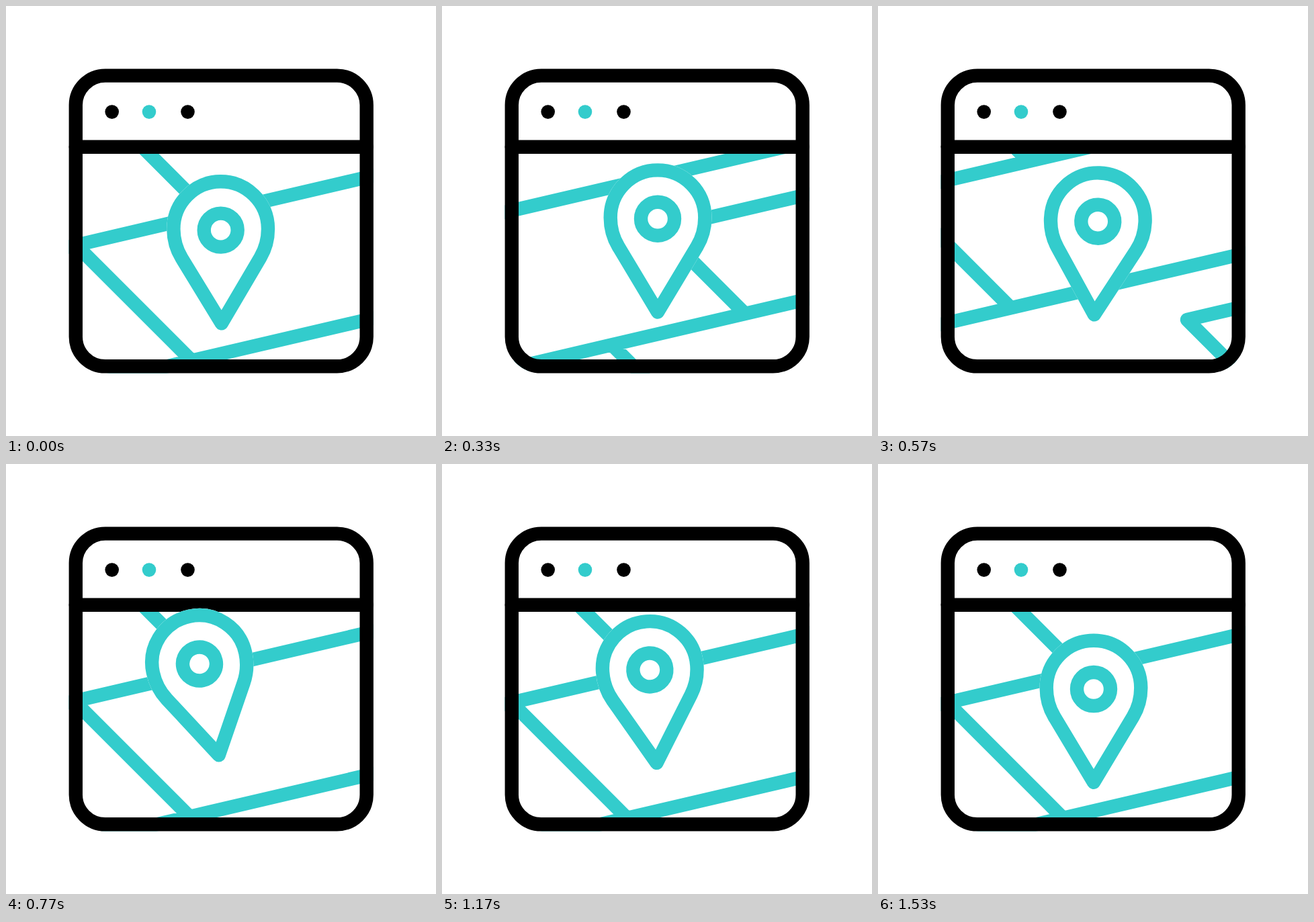
Write an HTML page that moves like this. It is 640 px wide and 640 px high and loops after 1.67 s.

```html
<!DOCTYPE html>
<html lang="en">
<head>
<meta charset="utf-8">
<title>Map window</title>
<style>
  html, body { margin: 0; width: 100%; height: 100%; overflow: hidden; background: #fff; }
  svg { display: block; width: 100vw; height: 100vh; }
  .line { fill: none; stroke-width: 20.4; stroke-linecap: round; stroke-linejoin: round; }
  .teal { stroke: #33cccc; }
  .black { stroke: #000; }
  .white { stroke: #fff; }
</style>
</head>
<body>
<svg viewBox="0 0 640 640">
  <defs>
    <clipPath id="view">
      <path d="M93.6 209.7H546.9V492.5A54 54 0 0 1 492.9 546.5H147.6A54 54 0 0 1 93.6 492.5Z"/>
    </clipPath>
    <path id="drop" d="M321 262.7C282.1 262.7 250.7 294.3 250.7 333.2C250.7 349.3 255 363.7 262.5 376.2L321 473.8L379.5 376.2C387 363.7 391.3 349.3 391.3 333.2C391.3 294.3 359.9 262.7 321 262.7Z"/>
  </defs>
  <g clip-path="url(#view)"><path id="roads" class="line teal"/></g>
  <rect class="line black" x="103.8" y="103.6" width="432.9" height="432.7" rx="44"/>
  <path class="line black" d="M103.8 209.7H536.7"/>
  <circle cx="157.7" cy="157.6" r="10.3"/>
  <circle cx="213" cy="157.6" r="10.3" fill="#33cccc"/>
  <circle cx="270.5" cy="157.6" r="10.3"/>
  <g id="pin">
    <use href="#drop" class="line white" style="fill:#fff"/>
    <use href="#drop" class="line teal"/>
    <circle class="line teal" cx="321" cy="335" r="25"/>
  </g>
</svg>
<script>
const LOOP = 1670, STEP = 100 / 3;
const TILE = 362, SLOPE = 0.2335;
const roads = document.getElementById('roads');
const pin = document.getElementById('pin');

// step, distance, speed: the map slides diagonally by one tile
const slide = [
  [-0.7, 0, 0], [0, 0.85, 2.4], [7, 86.3, 19.3], [10, 149.2, 21.5],
  [17, 284.4, 17], [23, 359.9, 3.5], [24.1, TILE, 0]
];

// step, lift, tilt in degrees
const hops = [
  [-0.7, 0, 0], [6, 46.5, -15.4], [13, 0, 10], [23, 41, -12],
  [29.6, 0, 10], [36, 31, -5.2], [46, 0, 0]
];

function segment(keys, n) {
  let i = 0;
  while (i < keys.length - 2 && n > keys[i + 1][0]) i++;
  const a = keys[i], b = keys[i + 1], len = b[0] - a[0];
  const u = Math.min(1, Math.max(0, (n - a[0]) / len));
  return { a, b, len, u, ease: u * u * (3 - 2 * u) };
}

function mapShift(n) {
  const { a, b, len, u, ease } = segment(slide, n);
  const v = 1 - u;
  return a[1] + (b[1] - a[1]) * ease + len * u * v * (v * a[2] - u * b[2]);
}

function pinPose(n) {
  const { a, b, ease } = segment(hops, n);
  return [1, 2].map(k => a[k] + (b[k] - a[k]) * ease);
}

// One tile: two long roads, a branch with a corner, two diagonal links
function tile(d) {
  const pt = (x, y) => (x + d).toFixed(2) + ' ' + (y + d).toFixed(2);
  const road = base => x => base - SLOPE * x;
  const upper = road(379.3), lower = road(591.3);
  const cross = (base, c) => (base - c) / (1 + SLOPE);
  const far = 1600, cx = 175.6, cy = 182.6;
  const j1 = cross(379.3, 7), j2 = cross(379.3, 251.5), j3 = cross(591.3, 251.5);
  return [upper, lower].map(f => `M${pt(-far, f(-far))}L${pt(far, f(far))}`).join('') +
    `M${pt(cx + far, cy - SLOPE * far)}L${pt(cx, cy)}L${pt(j1, j1 + 7)}` +
    `M${pt(j2, j2 + 251.5)}L${pt(j3, j3 + 251.5)}`;
}

function draw(ms) {
  const n = Math.floor((ms % LOOP + 3.4) / STEP);
  const s = mapShift(n);
  roads.setAttribute('d', [-2, -1, 0, 1].map(i => tile(s + i * TILE)).join(''));
  const [lift, tilt] = pinPose(n);
  pin.setAttribute('transform', `translate(0 ${-lift}) rotate(${tilt} 321 494)`);
}

let start = null;
function tick(now) {
  if (start === null) start = now;
  draw(Math.max(0, now - start));
  requestAnimationFrame(tick);
}
draw(0);
requestAnimationFrame(tick);
</script>
</body>
</html>
```
